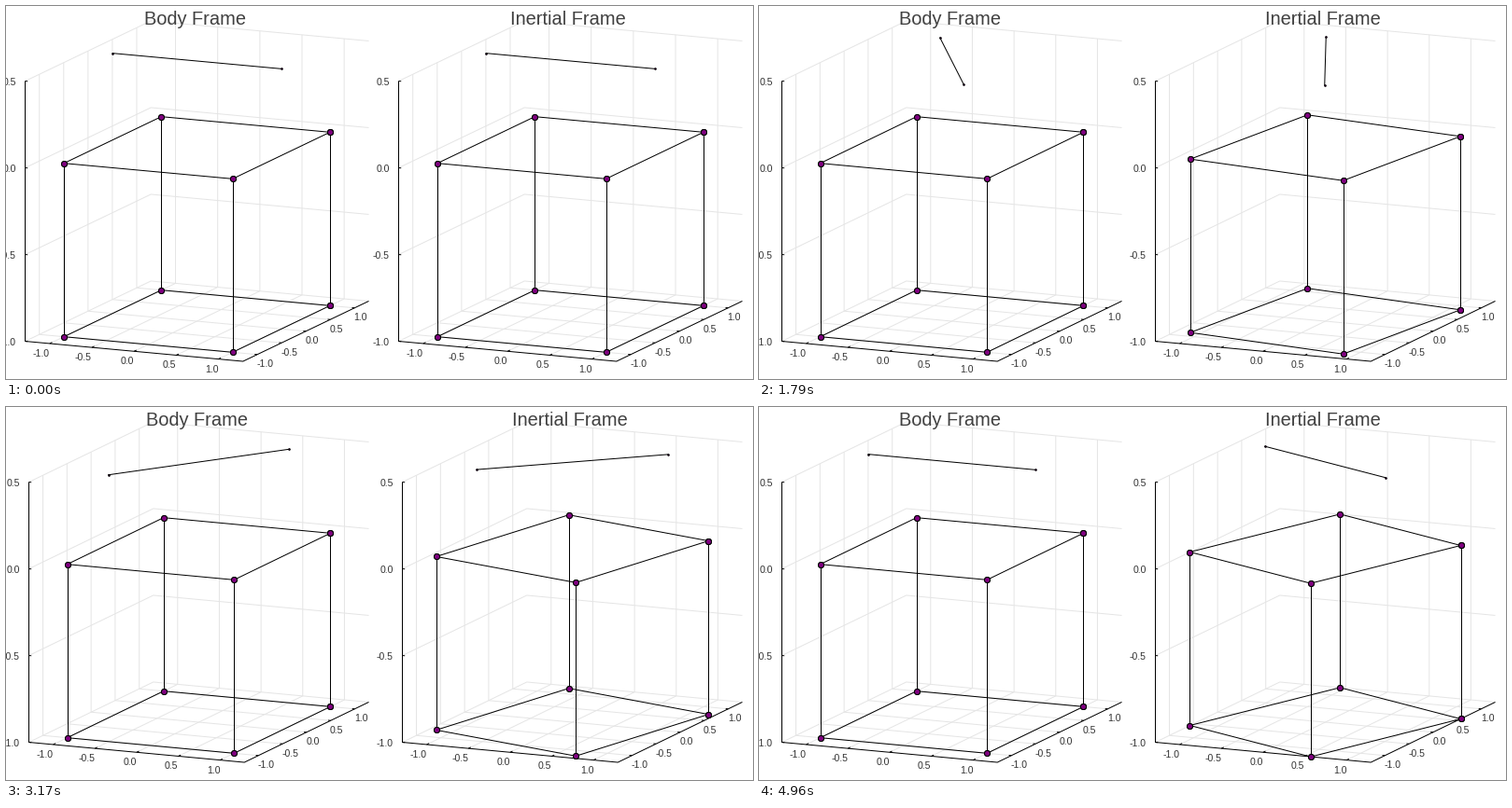
These frames come from a looping animation (800x400 px, 5000 ms). A matplotlib script:

```python
import numpy as np
import matplotlib.pyplot as plt
from matplotlib.animation import FuncAnimation
from matplotlib.collections import LineCollection

W, H, DPI = 800, 400, 100
PX = 72 / DPI               # points per pixel
LOOP, INTERVAL, STEPS = 5000, 20, 120
FRAMES = LOOP // INTERVAL

LIM = 1.2915                # half range of the x and y axes
ZMIN, ZMAX = -1.0, 0.5
TICKS = (-1.0, -0.5, 0.0, 0.5, 1.0)
ZTICKS = (-1.0, -0.5, 0.0, 0.5)
RIGHT = 388                 # right end of a panel
INK, GRID, PURPLE = "black", "#e5e5e5", "#800080"

plt.rcParams["font.family"] = "Liberation Sans"
fig = plt.figure(figsize=(W / DPI, H / DPI), dpi=DPI, facecolor="white")
ax = fig.add_axes([0, 0, 1, 1])
ax.set(xlim=(-0.5, W - 0.5), ylim=(H - 0.5, -0.5))
ax.axis("off")


class View:
    """Oblique 3D to pixel projection of one panel."""

    def __init__(self, offset, left):
        half = (RIGHT - left) / 2
        scale = half / LIM / (np.cos(np.pi / 6) + 0.5)
        self.cx = offset + left + half
        self.ux, self.uy = scale * np.cos(np.pi / 6), scale / 2

    def __call__(self, x, y, z):
        return (self.cx + self.ux * x + self.uy * y,
                151.5 + 8.33 * x - 25 * y - 186 * z)

    def path(self, *points):
        return [self(*p) for p in points]


def label(x, y, text, ha, size=10.5, color="#333333"):
    return ax.text(x, y, text, ha=ha, va="baseline", fontsize=size * PX,
                   color=color, zorder=3)


def scaffold(view, title):
    """Grid, axes, ticks and labels of one panel."""
    grid, marks, art = [], [], []
    for t in TICKS:
        grid.append(view.path((t, -LIM, ZMIN), (t, LIM, ZMIN), (t, LIM, ZMAX)))
        grid.append(view.path((LIM, t, ZMIN), (-LIM, t, ZMIN), (-LIM, t, ZMAX)))
        marks.append(view.path((t, -LIM, ZMIN), (t, -LIM + 0.05, ZMIN)))
        marks.append(view.path((LIM, t, ZMIN), (LIM - 0.03, t, ZMIN)))
        x, y = view(t, -LIM, ZMIN)
        art.append(label(x, y + 14, f"{t:.1f}", "right"))
        x, y = view(LIM, t, ZMIN)
        art.append(label(x - 0.7, y + 13.7, f"{t:.1f}", "left"))
    for t in ZTICKS:
        grid.append(view.path((-LIM, -LIM, t), (-LIM, LIM, t), (LIM, LIM, t)))
        marks.append(view.path((-LIM, -LIM, t), (-LIM + 0.03, -LIM, t)))
        x, y = view(-LIM, -LIM, t)
        art.append(label(x - 9.5, y + 4, f"{t:.1f}", "right"))
    marks.append(view.path((-LIM, -LIM, ZMAX), (-LIM, -LIM, ZMIN),
                           (LIM, -LIM, ZMIN), (LIM, LIM, ZMIN)))
    for paths, color, z in ((grid, GRID, 0), (marks, INK, 1)):
        lines = LineCollection(paths, colors=color, linewidths=PX, zorder=z)
        art.append(ax.add_collection(lines))
    art.append(label(view.cx - 2.5, 19, title, "center", 20, "#404040"))
    return art


def stroke(size):
    return ax.plot([], [], "-o", color=INK, lw=PX, ms=size * PX, mfc=PURPLE,
                   mec=INK, mew=PX, zorder=2)[0]


class Panel:
    def __init__(self, offset, title):
        self.views = [View(offset, left) for left in (20, 24)]
        self.scaffolds = [scaffold(v, title) for v in self.views]
        self.edges = [stroke(6) for _ in range(6)]
        self.rod = stroke(1.6)

    def draw(self, step, cube, rod):
        late = int(step > 0)    # the plot area narrows after the first step
        for i, art in enumerate(self.scaffolds):
            for a in art:
                a.set_visible(i == late)
        view = self.views[late]
        angles = cube + np.pi / 4 + np.arange(5) * np.pi / 2
        x, y = np.sqrt(2) * np.cos(angles), np.sqrt(2) * np.sin(angles)
        self.edges[0].set_data(*view(x, y, -1))
        self.edges[1].set_data(*view(x, y, 0))
        for k, edge in enumerate(self.edges[2:]):
            edge.set_data(*view(x[[k, k]], y[[k, k]], np.array([-1, 0])))
        ends = np.array([-1, 1])
        self.rod.set_data(*view(ends * np.cos(rod), ends * np.sin(rod), 0.5))


body = Panel(0, "Body Frame")
inertial = Panel(400, "Inertial Frame")


def update(i):
    step = int((i + 0.5) * STEPS / FRAMES)
    spin = 2 * np.pi * step / (STEPS - 1)
    recoil = -spin / 17     # the body turns against the rod
    body.draw(step, 0, spin)
    inertial.draw(step, recoil, spin + recoil)
    return []


anim = FuncAnimation(fig, update, frames=FRAMES, interval=INTERVAL,
                     repeat=True, repeat_delay=0, init_func=lambda: update(0))
plt.show()
```
